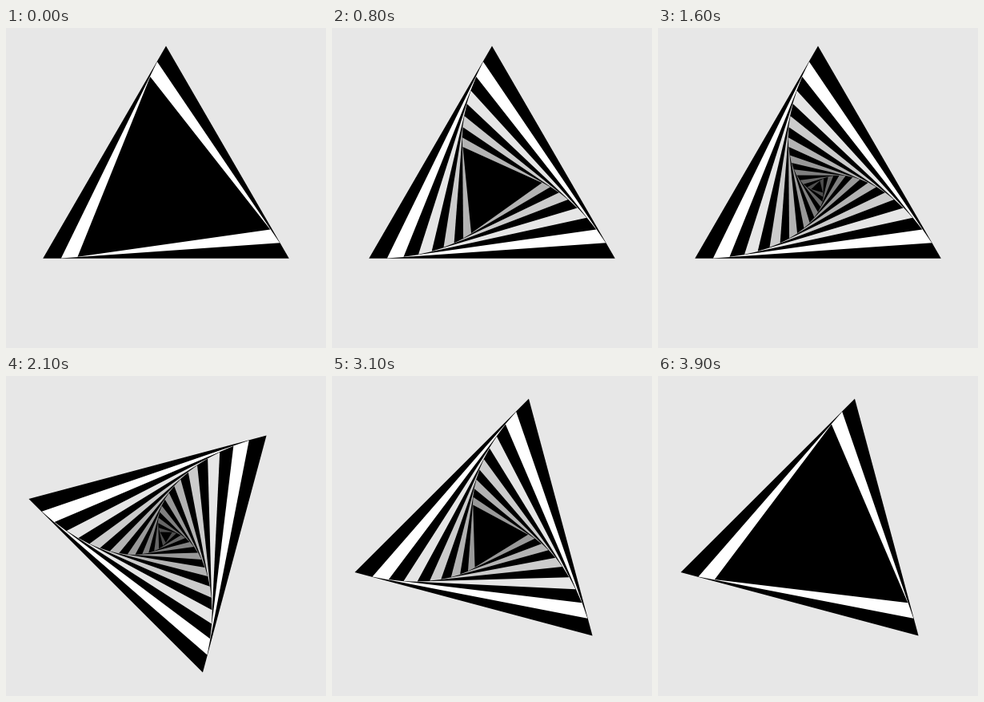
Recreate the animation shown at these times as an HTML page with a canvas. Size 400 by 401 pixels, loop 4 s.

```html
<!DOCTYPE html>
<html lang="en">
<head>
<meta charset="utf-8">
<title>Spiralling triangles</title>
<style>
  html, body { margin: 0; width: 100%; height: 100%; overflow: hidden; background: #e7e7e7; }
  canvas { display: block; }
</style>
</head>
<body>
<canvas id="stage" width="400" height="401"></canvas>
<script>
const ctx = document.getElementById('stage').getContext('2d');
const LOOP = 4000, TICK = 100;
const CENTER = [200, 200], RADIUS = 177.6;
const RINGS = 8, GAP = 0.65;

// Each triangle leans on the sides of the one around it, with a hairline gap.
function inscribe(tri) {
  const radius = Math.hypot(...tri[0]);
  const side = radius * Math.sqrt(3);
  const t = 0.0603 + 3.6 / side;
  const inner = tri.map(([x, y], i) => {
    const [nx, ny] = tri[(i + 1) % 3];
    return [x + (nx - x) * t, y + (ny - y) * t];
  });
  const shrink = 1 - GAP / Math.hypot(...inner[0]);
  return inner.map(([x, y]) => [x * shrink, y * shrink]);
}

const triangles = [[-90, 150, 30].map(deg => {
  const a = deg * Math.PI / 180;
  return [RADIUS * Math.cos(a), RADIUS * Math.sin(a)];
})];
for (let k = 0; k < RINGS * 2; k++) triangles.push(inscribe(triangles[k]));

// Light rings appear from the outside in and vanish from the inside out.
function ringVisible(i, time) {
  if (i === 0) return true;
  const show = 200 * i + 50;
  const hide = 4090 - 240 * i;
  return time >= show && time < hide;
}

function fill(tri, color) {
  ctx.fillStyle = color;
  ctx.beginPath();
  tri.forEach(([x, y]) => ctx.lineTo(x, y));
  ctx.closePath();
  ctx.fill();
}

function draw(time) {
  ctx.setTransform(1, 0, 0, 1, 0, 0);
  ctx.fillStyle = '#e7e7e7';
  ctx.fillRect(0, 0, 400, 401);
  ctx.translate(...CENTER);
  ctx.rotate(-15 * (time / TICK) * Math.PI / 180);
  fill(triangles[0], '#000');
  for (let i = 0; i < RINGS; i++) {
    if (!ringVisible(i, time)) continue;
    const v = Math.round(255 * (1 - i / 10));
    fill(triangles[2 * i + 1], `rgb(${v},${v},${v})`);
    fill(triangles[2 * i + 2], '#000');
  }
}

const start = performance.now();
function frame() {
  const time = (performance.now() - start) % LOOP;
  draw(Math.floor(time / TICK) * TICK);
  requestAnimationFrame(frame);
}
frame();
</script>
</body>
</html>
```
